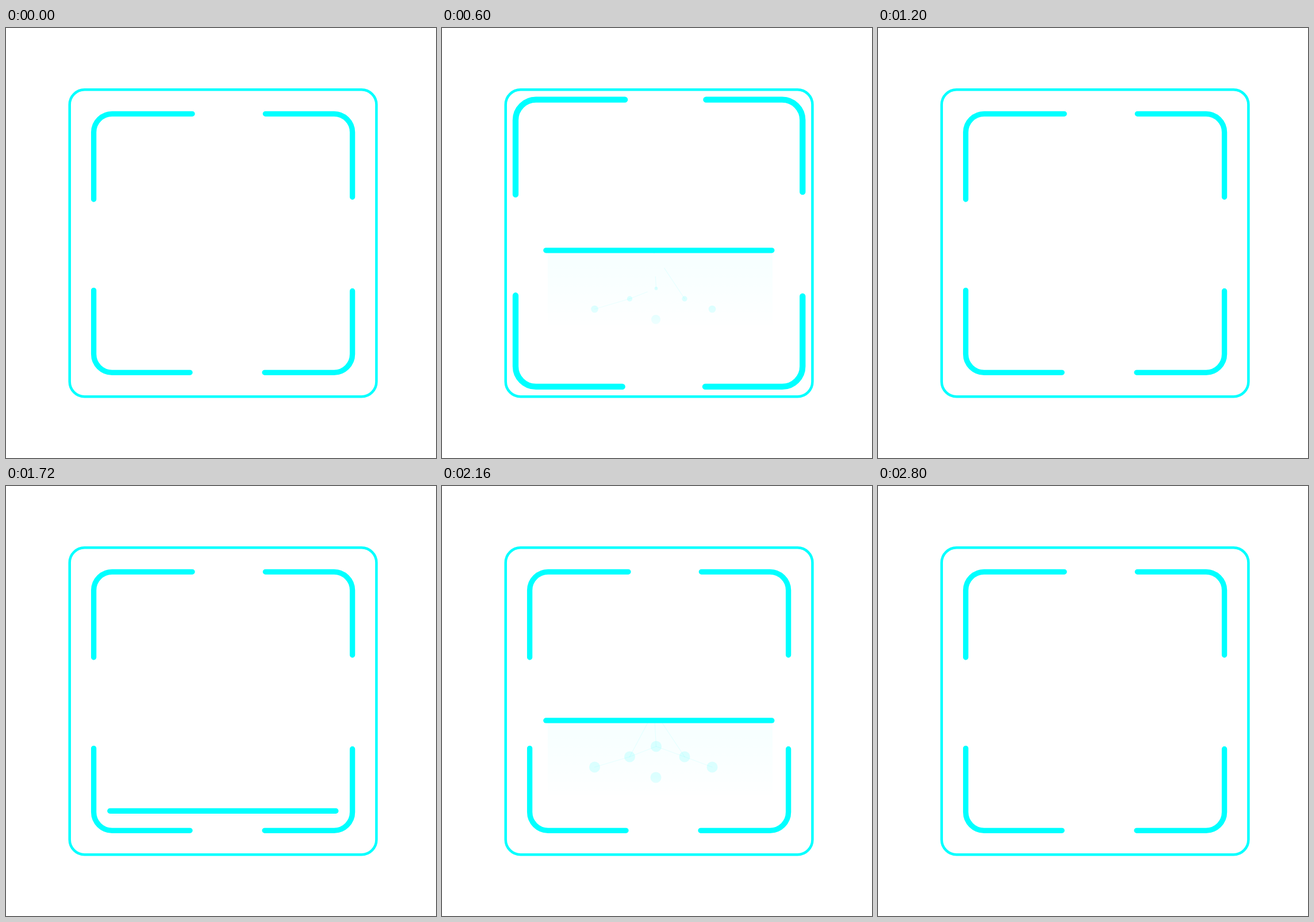
An HTML page with a canvas that plays this animation: 748x748 px, repeating every 3.2 s.

```html
<!DOCTYPE html>
<html lang="en">
<head>
<meta charset="utf-8">
<title>Scanner</title>
<style>
  html, body { margin: 0; width: 100%; height: 100%; overflow: hidden; background: #fff; }
  canvas { display: block; width: 748px; height: 748px; }
</style>
</head>
<body>
<canvas id="stage" width="748" height="748"></canvas>
<script>
const ctx = document.getElementById('stage').getContext('2d');
const LOOP = 3200, PASS = 1600, SCAN = 1080, STEP = 40;
const FLOOR = 574, TOP = 186.7, TRAIL = 130;
const CX = 377.6, CY = 374.3;

// Face mesh from chin to temples; "up" counts the rows each link climbs
const rows = [
  { y: 507, xs: [372], up: [] },
  { y: 489, xs: [265.5, 470], up: [1] },
  { y: 471, xs: [326.5, 422], up: [1, 2] },
  { y: 453, xs: [372.5], up: [1] },
  { y: 391, xs: [369], up: [1, 2] },
  { y: 365, xs: [326.5, 408], up: [1, 2] },
  { y: 278, xs: [313, 417], up: [] },
  { y: 231, xs: [203, 531], up: [] }
];
const birth = row => 410 + 40 * row;

const clamp = v => Math.min(1, Math.max(0, v));
const smooth = v => v * v * (3 - 2 * v);
const cyan = a => `rgba(0,255,255,${a})`;

// Timing curve with control points (a, 0) and (b, 1)
function ease(x, a, b) {
  let lo = 0, hi = 1;
  for (let i = 0; i < 24; i++) {
    const u = (lo + hi) / 2, v = 1 - u;
    if (3 * a * u * v * v + 3 * b * u * u * v + u * u * u < x) lo = u;
    else hi = u;
  }
  return smooth(lo);
}

// Paint that holds its strength below the scan line, then fades
function fade(y, alpha, hold, end) {
  const g = ctx.createLinearGradient(0, y, 0, y + TRAIL);
  g.addColorStop(hold, cyan(alpha));
  g.addColorStop(1, cyan(end));
  return g;
}

function pen(style, width) {
  ctx.strokeStyle = style;
  ctx.lineWidth = width;
  ctx.lineCap = 'round';
}

function line(x, y, x2, y2) {
  ctx.beginPath();
  ctx.moveTo(x, y);
  ctx.lineTo(x2, y2);
  ctx.stroke();
}

function drawFrame() {
  pen(cyan(1), 4.5);
  ctx.beginPath();
  ctx.roundRect(110.7, 107.3, 533.7, 533.9, 26);
  ctx.stroke();
}

function corner(x, y, endX, endY) {
  ctx.beginPath();
  ctx.moveTo(x, endY);
  ctx.arcTo(x, y, endX, y, 32);
  ctx.lineTo(endX, y);
  ctx.stroke();
}

function drawCorners(scale) {
  const l = CX - 225, r = CX + 225, t = CY - 225, b = CY + 225;
  ctx.save();
  ctx.translate(CX, CY);
  ctx.scale(scale, scale);
  ctx.translate(-CX, -CY);
  pen(cyan(1), 9.3);
  corner(l, t, 324, 298);
  corner(r, t, 451.3, 294);
  corner(l, b, 320, 456.3);
  corner(r, b, 450, 457.5);
  ctx.restore();
}

function drawLinks(lower, step, time) {
  const from = rows[lower], to = rows[lower + step];
  const count = Math.max(from.xs.length, to.xs.length);
  for (let i = 0; i < count; i++) {
    // sides take turns: short links start on the left, long ones on the right
    const late = (i === 0) === (step > 1);
    const k = clamp((time - birth(lower) - (late ? 150 : 30)) / 120);
    if (!k) continue;
    const x = from.xs[i % from.xs.length], x2 = to.xs[i % to.xs.length];
    line(x, from.y, x + (x2 - x) * k, from.y + (to.y - from.y) * k);
  }
}

function drawMesh(y, time) {
  pen(fade(y, 0.08, 0.7, 0.03), 1.2);
  rows.forEach((row, n) => row.up.forEach(step => drawLinks(n, step, time)));
  ctx.fillStyle = fade(y, 0.13, 0.75, 0.06);
  rows.forEach((row, n) => row.xs.forEach(x => {
    ctx.beginPath();
    ctx.arc(x, row.y, 9.5 * clamp((time - birth(n)) / 225), 0, Math.PI * 2);
    ctx.fill();
  }));
}

function drawScan(time, meshTime) {
  const y = FLOOR + (TOP - FLOOR) * ease(time / SCAN, 0.422, 0.756);
  ctx.save();
  ctx.beginPath();
  ctx.rect(0, 0, 748, FLOOR);
  ctx.clip();

  ctx.save();
  ctx.beginPath();
  ctx.rect(184, y, 391, TRAIL);
  ctx.clip();
  ctx.fillStyle = fade(y, 0.03, 0.2, 0.004);
  ctx.fillRect(184, y, 391, TRAIL);
  drawMesh(y, meshTime);
  ctx.restore();

  pen(cyan(1), 9.3);
  line(180.8, y, 573.8, y);
  ctx.restore();
}

function render(now) {
  const t = Math.floor((now % LOOP) / STEP) * STEP;
  const local = t % PASS;
  const first = t < PASS;
  ctx.fillStyle = '#fff';
  ctx.fillRect(0, 0, 748, 748);
  drawFrame();
  const pulse = first ? smooth(clamp(1 - Math.abs(t - 560) / 560)) : 0;
  drawCorners(1 + pulse / 9);
  if (local > 0 && local <= SCAN) drawScan(local, first ? local : LOOP);
}

let start;
function tick(now) {
  if (start === undefined) start = now;
  render(now - start);
  requestAnimationFrame(tick);
}
render(0);
requestAnimationFrame(tick);
</script>
</body>
</html>
```
